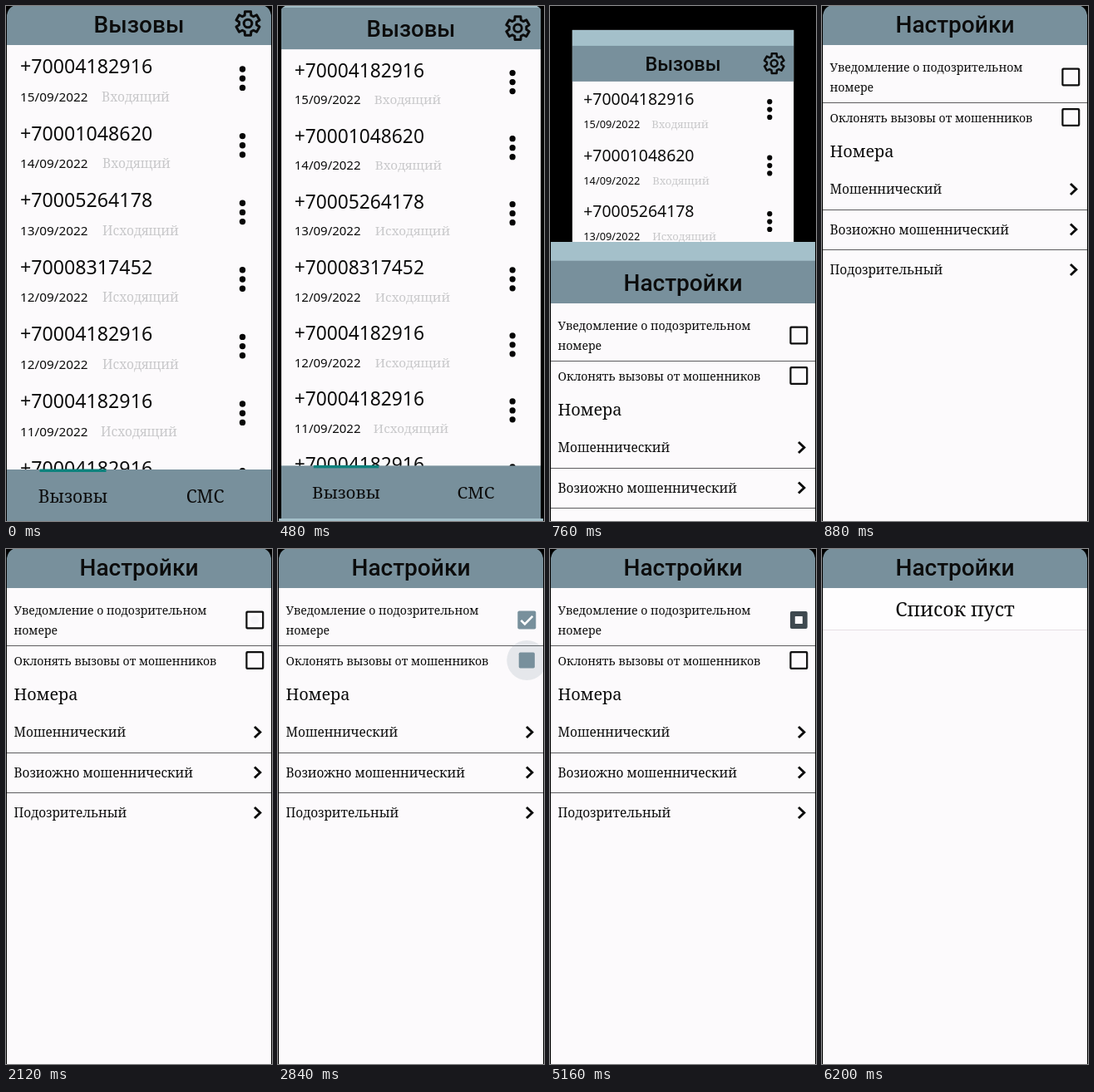
Animation of 320 by 620 pixels, one loop 7.68 s. Source, as an HTML page:

```html
<!DOCTYPE html>
<html lang="ru">
<head>
<meta charset="utf-8">
<title>Вызовы</title>
<style>
html, body { margin: 0; width: 100%; height: 100%; overflow: hidden; background: #000; }
svg { display: block; width: 100vw; height: 100vh; }
text { fill: #0c0c0c; white-space: pre; }
.title { font: 500 28px Roboto, sans-serif; text-anchor: middle; }
.num { font-family: "Noto Sans", sans-serif; font-weight: 300; }
.serif { font-family: "Noto Serif", serif; }
.pale { fill: #c8c8ca; }
.mid { text-anchor: middle; }
</style>
</head>
<body>
<svg id="stage" viewBox="0 0 320 620" xmlns="http://www.w3.org/2000/svg"></svg>
<script>
const LOOP = 7680, STEP = 40;
const TOP = -27, HEIGHT = 689, MID = 317;
const BAR = '#78909c', STRIP = '#a4c0ca', PAPER = '#fcfafc', INK = '#0c0c0c';

const stage = document.getElementById('stage');
const clamp = v => Math.max(0, Math.min(1, v));
const ramp = (t, from, len) => clamp((t - from) / len);

const rect = (x, y, w, h, fill) =>
  `<rect x="${x}" y="${y}" width="${w}" height="${h}" fill="${fill}"/>`;
const label = (x, y, size, text, cls = 'serif') =>
  `<text x="${x}" y="${y}" class="${cls}" font-size="${size}">${text}</text>`;
const header = title =>
  rect(1, TOP, 318, 23, STRIP) + rect(1, -4.3, 318, 51.3, BAR) +
  `<text class="title" x="160" y="32">${title}</text>`;
const paper = () => rect(1, TOP, 318, HEIGHT, PAPER);

function gear(cx, cy) {
  const pts = [];
  for (let k = 0; k < 6; k++) {
    for (const [r, off] of [[10.6, -21], [14.6, -14], [14.6, 14], [10.6, 21]]) {
      const a = (k * 60 - 90 + off) * Math.PI / 180;
      pts.push((cx + r * Math.cos(a)).toFixed(2) + ',' + (cy + r * Math.sin(a)).toFixed(2));
    }
  }
  return `<g fill="none" stroke="${INK}" stroke-width="3" stroke-linejoin="round">
    <polygon points="${pts.join(' ')}"/><circle cx="${cx}" cy="${cy}" r="4.8"/></g>`;
}

// Call list
const calls = [
  ['+70004182916', '15/09/2022', 'Входящий', 115],
  ['+70001048620', '14/09/2022', 'Входящий', 116],
  ['+70005264178', '13/09/2022', 'Исходящий', 116],
  ['+70008317452', '12/09/2022', 'Исходящий', 116],
  ['+70004182916', '12/09/2022', 'Исходящий', 116],
  ['+70004182916', '11/09/2022', 'Исходящий', 114],
  ['+70004182916', '11/09/2022', 'Исходящий', 114]
];

function callRow([phone, date, kind, x], i) {
  const dots = [76, 87.2, 98.4]
    .map(y => `<circle cx="284.5" cy="${y}" r="3.7" fill="#050505"/>`).join('');
  return `<g transform="translate(0 ${(i * 80.6).toFixed(1)})">` +
    label(17, 81, 23.2, phone, 'num') +
    label(17, 114.5, 15.3, date, 'num') +
    label(x, 114.5, 15.6, kind, 'serif pale') + dots + '</g>';
}

const listScreen = paper() + calls.map(callRow).join('') + header('Вызовы') + gear(291, 21) +
  rect(1, 558, 318, 104, BAR) + rect(40.5, 557.5, 80, 3.5, '#0d827d') +
  label(80.5, 598, 21.1, 'Вызовы', 'serif mid') +
  label(239.5, 598, 21.1, 'СМС', 'serif mid');

// Settings
const rule = y => rect(1, y, 318, 1, '#5c5c5e');
const link = (y, text) => label(9.5, y + 5.5, 15.45, text) +
  `<polyline points="299,${y - 6.5} 305.8,${y} 299,${y + 6.5}" fill="none" stroke="${INK}" stroke-width="2.9"/>`;
const box = (id, y) => `<g id="${id}" transform="translate(299.3 ${y})">
  <circle class="ripple" fill="${BAR}"/>
  <g class="face"><path class="frame" fill-rule="evenodd"/>
  <polyline class="tick" points="-7,0.3 -2.4,5 7,-4.6" fill="none" stroke="#fff" stroke-width="2.6"
    pathLength="1" stroke-dasharray="1 2"/></g></g>`;

const settingsScreen = paper() + header('Настройки') +
  label(9.5, 79, 14.1, 'Уведомление о подозрительном') +
  label(9.5, 103.3, 14.1, 'номере') +
  label(9.5, 139.5, 14, 'Оклонять вызовы от мошенников') +
  label(9.5, 182, 19.9, 'Номера') +
  rule(116) + rule(245) + rule(293) +
  link(220.5, 'Мошеннический') + link(269, 'Возиожно мошеннический') + link(317.5, 'Подозрительный') +
  box('notify', 85.5) + box('reject', 134);

const emptyScreen = paper() + header('Настройки') + rect(1, 47, 318, 50, '#fefdfe') +
  rect(1, 97, 318, 1, '#e6dfe4') +
  label(160, 81, 23.2, 'Список пуст', 'serif mid');

const corner = '<path d="M0 0H8.5Q2.5 2.5 1 11V620H0Z"/>';
stage.innerHTML = rect(0, 0, 320, 620, '#000') +
  `<g id="list">${listScreen}</g><g id="settings">${settingsScreen}</g><g id="empty">${emptyScreen}</g>` +
  corner + `<g transform="matrix(-1 0 0 1 320 0)">${corner}</g>`;

const $ = id => document.getElementById(id);
const list = $('list'), settings = $('settings'), empty = $('empty');

const boxes = [
  { el: $('notify'), on: 2100, off: 4720 },
  { el: $('reject'), on: 2640, off: 4240 }
];

function square(half, r) {
  const s = 2 * (half - r);
  return `M${r - half} ${-half}h${s}q${r} 0 ${r} ${r}v${s}q0 ${r} ${-r} ${r}` +
    `h${-s}q${-r} 0 ${-r} ${-r}v${-s}q0 ${-r} ${r} ${-r}z`;
}

function drawBox({ el, on, off }, t) {
  const part = name => el.querySelector('.' + name);
  const state = ramp(t, on + 60, 440) - ramp(t, off + 60, 440);
  const fill = clamp(state / 0.3);
  const dip = state < 0.32 ? state / 0.32 : 1 - clamp((state - 0.32) / 0.3);
  const tick = clamp((state - 0.36) / 0.6);
  const hole = 8.8 * (1 - fill);
  const mix = [120, 144, 156].map(c => Math.round(14 + (c - 14) * fill));

  part('face').setAttribute('transform', `scale(${1 - 0.13 * dip})`);
  part('frame').setAttribute('d', square(11, 2) + (hole > 0.1 ? square(hole, Math.min(0.6, hole)) : ''));
  part('frame').setAttribute('fill', `rgb(${mix})`);
  part('tick').setAttribute('stroke-dashoffset', 1 - tick);
  part('tick').setAttribute('opacity', tick > 0 ? 1 : 0);

  const age = t - (t >= off ? off : on);
  const grow = 1 - (1 - ramp(age, 0, 180)) ** 2;
  part('ripple').setAttribute('r', 24 * grow);
  part('ripple').setAttribute('opacity', 0.18 * ramp(age, 0, 80) * (1 - ramp(age, 230, 190)));
}

function draw(t) {
  const rise = ramp(t, 200, 680) ** 3.087;
  const scale = 1 - 0.296 * rise;
  list.setAttribute('transform', `translate(160 ${MID}) scale(${scale}) translate(-160 ${-MID})`);
  settings.setAttribute('transform', `translate(0 ${Math.round(HEIGHT * (1 - rise))})`);
  boxes.forEach(b => drawBox(b, t));
  const fade = ramp(t, 5850, 350);
  empty.setAttribute('opacity', fade);
  empty.setAttribute('visibility', fade > 0 ? 'visible' : 'hidden');
}

const start = performance.now();
function loop() {
  const t = (performance.now() - start) % LOOP;
  draw(Math.floor(t / STEP) * STEP);
  requestAnimationFrame(loop);
}
draw(0);
requestAnimationFrame(loop);
</script>
</body>
</html>
```
